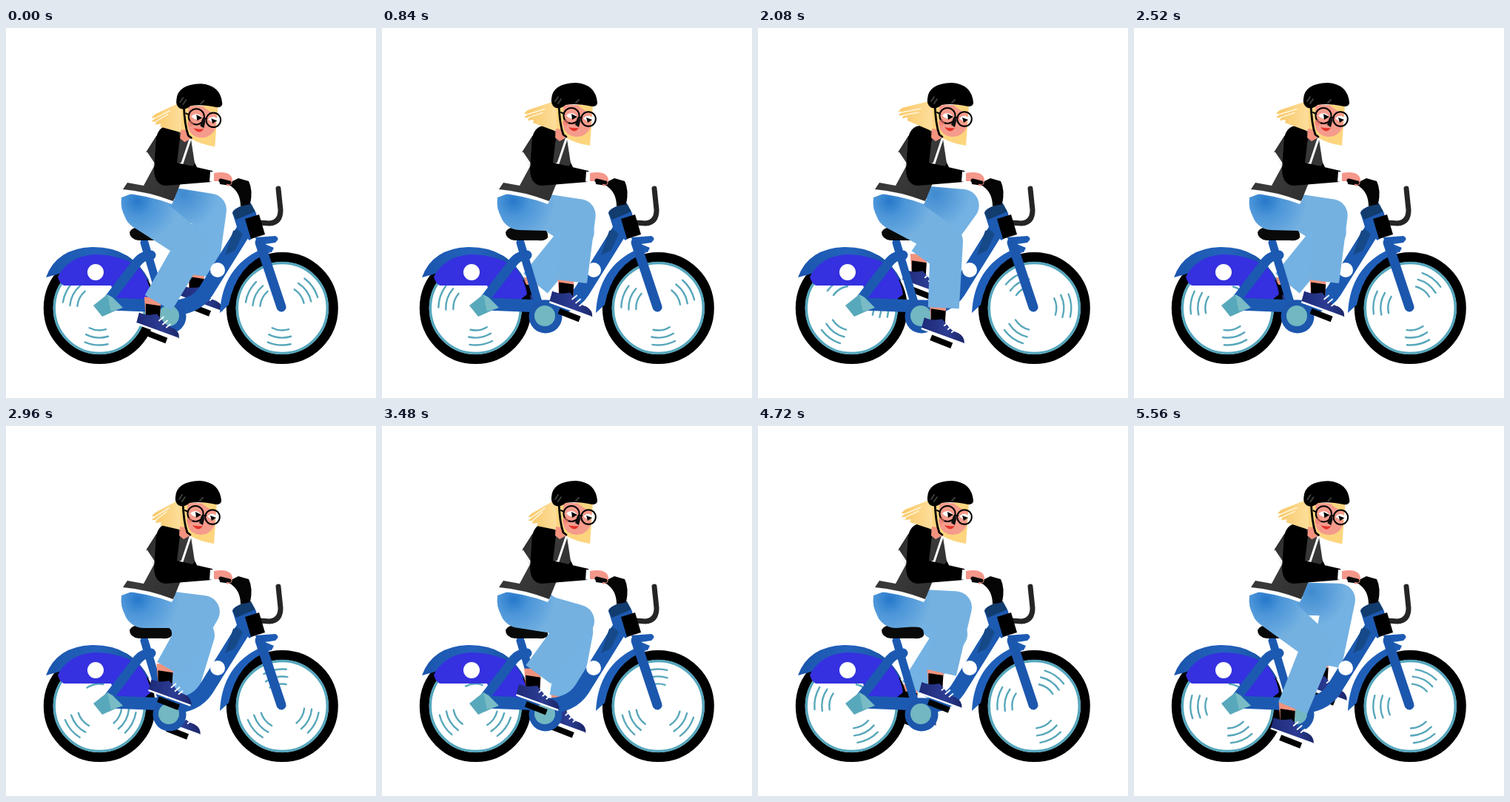
An HTML page that plays this animation: 500 px wide and 500 px high, repeating every 5600 ms.

```html
<!DOCTYPE html>
<html lang="en">
<head>
<meta charset="utf-8">
<title>Cyclist</title>
<style>
  html, body { margin: 0; width: 100%; height: 100%; overflow: hidden; background: #fff; }
  svg { display: block; width: 100vw; height: 100vh; }
  .line { fill: none; stroke-linecap: round; stroke-linejoin: round; }
</style>
</head>
<body>
<svg viewBox="0 0 500 500">
  <defs>
    <radialGradient id="nearDenim" gradientUnits="userSpaceOnUse" cx="178" cy="234" r="56">
      <stop offset="0" stop-color="#2678ca"/><stop offset=".35" stop-color="#4a94d8"/><stop offset="1" stop-color="#74b1e1"/>
    </radialGradient>
    <radialGradient id="farDenim" gradientUnits="userSpaceOnUse" cx="240" cy="224" r="48">
      <stop offset="0" stop-color="#3f8ad0"/><stop offset="1" stop-color="#74b2e3"/>
    </radialGradient>
    <linearGradient id="shoeFill">
      <stop offset="0" stop-color="#1d2a78"/><stop offset=".6" stop-color="#2c3c92"/><stop offset="1" stop-color="#1b2668"/>
    </linearGradient>
    <linearGradient id="jacketFill" x2="1" y2="1">
      <stop offset="0" stop-color="#1e1e1e"/><stop offset=".5" stop-color="#3a3a3a"/><stop offset="1" stop-color="#2a2a2a"/>
    </linearGradient>
    <linearGradient id="hairFill">
      <stop offset="0" stop-color="#f9c765"/><stop offset="1" stop-color="#fde0a0"/>
    </linearGradient>
    <linearGradient id="fenderFill">
      <stop offset="0" stop-color="#1a55ad"/><stop offset=".5" stop-color="#2363bd"/><stop offset="1" stop-color="#174c9d"/>
    </linearGradient>
    <g id="shoe">
      <path d="M-19-8H4L2 20H-17Z" fill="#f0937e"/>
      <path d="M-17 1L3 4L2 21H-17Z"/>
      <path d="M-26 13Q-16 18-2 15L5 23Q10 31 20 34Q29 39 28 48L-30 28Z" fill="url(#shoeFill)"/>
      <path class="line" d="M-29 28L26 48" stroke="#fff" stroke-width="2.4"/>
      <path class="line" d="M1 24l6-5M6 29l6-5M11 33l5-4" stroke="#fff" stroke-width="1.8"/>
    </g>
    <path id="pedal" d="M-17 40L11 51" stroke="#000" stroke-width="8"/>
    <g id="wheel">
      <circle r="69" fill="#fff" stroke="#000" stroke-width="13"/>
      <circle r="61" fill="none" stroke="#55a6bc" stroke-width="3.5"/>
      <g class="line spin" stroke="#58a7bb" stroke-width="2.4"></g>
    </g>
  </defs>

  <g id="farLeg">
    <use href="#pedal"/>
    <use href="#shoe"/>
    <path fill="url(#farDenim)"/>
  </g>

  <use href="#wheel" x="126.3" y="378.5"/>
  <use href="#wheel" x="373.3" y="378.5"/>

  <!-- rear fender and skirt -->
  <path d="M54 337Q68 298 116 296Q170 295 194 342L186 338Q150 318 84 328Q70 333 54 337Z" fill="url(#fenderFill)"/>
  <path d="M70 336Q86 307 122 306Q164 308 183 327Q194 344 196 360L187 367H149L142 348H78Q72 345 70 336Z" fill="#3530e0"/>
  <circle cx="121" cy="330" r="11" fill="#fff"/>

  <!-- frame -->
  <g class="line" stroke="#1c5ab2">
    <path d="M138 368L176 318Q184 307 196 307" stroke-width="13"/>
    <path d="M187 290L212 374" stroke-width="11"/>
    <path d="M140 373L216 376" stroke-width="17" style="stroke-linecap:butt"/>
    <path d="M216 378Q254 380 270 356L326 266" stroke-width="21"/>
  </g>
  <path d="M307 274L325 268L309 301L296 307Z" fill="#164987"/>
  <circle cx="286" cy="327" r="10" fill="#fff"/>
  <path d="M118 375L137 360L157 378L130 390Z" fill="#58a8bb"/>
  <path d="M137 360L144 364L158 378L142 383Z" fill="#79bcc5"/>
  <circle cx="221" cy="390" r="22.5" fill="#1c57ad"/>
  <circle cx="220" cy="389" r="14" fill="#72b7c1"/>

  <!-- front end -->
  <path d="M289 385Q292 323 345 299L358 303Q312 318 301 374Z" fill="#1f5fb9"/>
  <path d="M337 283L364 281Q371 284 364 290L350 292L362 297L359 303L342 301Z" fill="#1d5bb4"/>
  <path class="line" d="M343 290L372 377" stroke="#1c57ae" stroke-width="13"/>
  <path class="line" d="M368 217L371 246Q371 263 356 264L342 263" stroke="#252525" stroke-width="7"/>
  <path d="M306 250Q308 242 330 238L338 250L342 278L329 287L313 272Z" fill="#1d5ab1"/>
  <path d="M306 250Q308 242 331 237L337 248L311 259Z" fill="#123c6e"/>
  <path d="M323 258L342 252L350 279L331 285Z"/>
  <path d="M288 204L304 208L314 203L328 207Q334 219 330 238L317 241Q317 222 303 213L289 211Z" fill="#050505"/>

  <!-- saddle -->
  <path d="M167 276Q170 268 185 269L218 272Q225 274 224 283Q222 288 210 287L179 287Q167 285 167 276Z" fill="#090909"/>

  <g id="nearLeg">
    <use href="#pedal"/>
    <use href="#shoe"/>
    <path fill="url(#nearDenim)"/>
  </g>
  <path d="M156 229L175 222L224 233L210 260L162 256Q154 246 156 229Z" fill="url(#nearDenim)"/>

  <!-- torso and arm -->
  <path d="M157 218L188 216L228 231L224 238Q192 226 156 223Z" fill="#fff"/>
  <path d="M243 158L258 188L246 192Z"/>
  <path d="M230 135L250 150L255 183L235 212L226 234Q192 221 158 218L164 209L186 213L200 187L189 168L203 146Z" fill="url(#jacketFill)"/>
  <path class="line" d="M190 169L202 187M249 150L238 183L220 190" stroke="#fff" stroke-width="3"/>
  <path d="M203 148Q207 131 222 132Q238 136 234 157L231 182L279 193L278 208L216 213Q200 212 200 190Z"/>
  <path d="M276 194l5 1l-1 13l-5-.5Z" fill="#fff"/>
  <path d="M281 196Q295 193 302 198Q308 202 305 211L299 214L297 207L281 207Z" fill="#f5978a"/>
  <path class="line" d="M290 206L302 209" stroke="#080808" stroke-width="5"/>

  <!-- head -->
  <g id="head">
    <path id="tuft" fill="url(#hairFill)"/>
    <path id="strands" class="line" stroke="#fff3d6" stroke-width="1.6"/>
    <path d="M235 103L285 105L281 159Q262 156 250 149L236 140Z" fill="#fcd57e"/>
    <path d="M235 136L243 137L249 148L240 153L234 148Z" fill="#f3937f"/>
    <path d="M245 105Q265 101 284 111L282 134Q276 147 262 147Q249 146 245 134Z" fill="#f59b8c"/>
    <path d="M263 103L284 105L284 115Q275 114 263 103Z" fill="#fcd57e"/>
    <path class="line" d="M239 103Q240 130 245 144L249 147" stroke="#000" stroke-width="2.8"/>
    <path d="M229 96Q230 75 262 74Q289 76 291 101Q291 106 284 106Q262 101 248 104Q240 111 233 107Q228 103 229 96Z"/>
    <path class="line" d="M234 99l4-6M238 102l4-6M262 101l4-4" stroke="#3c3c3c" stroke-width="2"/>
    <path d="M249 118Q257 111 264 120Q256 126 249 118ZM272 122Q279 115 286 123Q280 130 272 122Z" fill="#fff"/>
    <path d="M256 116l8 4l-7 4ZM276 121l8 3l-6 4Z"/>
    <g class="line" stroke="#000" stroke-width="2">
      <circle cx="256" cy="118.5" r="10.6"/>
      <circle cx="279" cy="123" r="9.8"/>
      <path d="M246 116l-4-2M266 121l4 0"/>
    </g>
    <path d="M264 121Q268 119 268 126L266 134L261 131Z" fill="#111"/>
    <path d="M252 134Q259 136 266 135Q260 144 252 134Z" fill="#e3332b"/>
    <circle cx="248" cy="128" r="4" fill="#f17c6e" opacity=".6"/>
  </g>
</svg>
<script>
  const FRAME_MS = 40, FRAMES = 140, PEDAL_TURNS = 10, WHEEL_TURNS = 11;
  const TAU = Math.PI * 2, DEG = TAU / 360;
  const $ = selector => document.querySelector(selector);
  const svgNS = "http://www.w3.org/2000/svg";
  const polar = (x, y, r, a) => [x + r * Math.cos(a), y + r * Math.sin(a)];
  const pts = list => list.map(p => p.map(v => v.toFixed(2)).join(" ")).join("L");

  const near = { el: $("#nearLeg"), hip: [186, 246], hipR: 27, center: [231, 357], turn: 150 * DEG };
  const far = { el: $("#farLeg"), hip: [196, 233], hipR: 22, center: [236, 340], turn: 350 * DEG };
  const THIGH = 81, SHIN = 90, KNEE_R = 22, HEM_R = 21, CRANK = 29;

  // Three groups of concentric arcs blur each wheel.
  const spin = $(".spin");
  for (const mid of [95, 207, 325]) {
    for (const [r, half] of [[30, 22], [40, 22], [50, 18]]) {
      const arc = document.createElementNS(svgNS, "path");
      const [a, b] = [mid - half, mid + half].map(deg => polar(0, 0, r, deg * DEG));
      arc.setAttribute("d", `M${pts([a])}A${r} ${r} 0 0 1 ${pts([b])}`);
      spin.append(arc);
    }
  }

  const disc = (x, y, r) => `M${x - r} ${y}a${r} ${r} 0 1 1 ${2 * r} 0a${r} ${r} 0 1 1 ${-2 * r} 0Z`;

  // Tapered band; its points keep the winding of the discs.
  function band(a, b, ra, rb) {
    const n = Math.atan2(b[1] - a[1], b[0] - a[0]) + Math.PI / 2;
    return "M" + pts([polar(...a, -ra, n), polar(...b, -rb, n), polar(...b, rb, n), polar(...a, ra, n)]) + "Z";
  }

  function drawLeg(leg, phase) {
    const hem = polar(...leg.center, CRANK, phase + leg.turn);
    const [dx, dy] = [hem[0] - leg.hip[0], hem[1] - leg.hip[1]];
    const d = Math.hypot(dx, dy);
    const bend = Math.acos((THIGH ** 2 + d ** 2 - SHIN ** 2) / (2 * THIGH * d));
    const knee = polar(...leg.hip, THIGH, Math.atan2(dy, dx) - bend);
    leg.el.lastElementChild.setAttribute("d",
      disc(...leg.hip, leg.hipR) + band(leg.hip, knee, leg.hipR, KNEE_R) +
      disc(...knee, KNEE_R) + band(knee, hem, KNEE_R, HEM_R));
    leg.el.querySelectorAll("use").forEach(part =>
      part.setAttribute("transform", `translate(${hem[0]} ${hem[1]})`));
  }

  function drawHead(phase) {
    const wave = Math.cos(phase - 65 * DEG);
    const x = 193.5 + 4 * wave, y = 121 + 5 * wave;
    const nod = 1.3 * Math.max(0, Math.cos(phase)) ** 12;
    $("#head").setAttribute("transform", `translate(${nod} ${nod})`);
    $("#tuft").setAttribute("d", "M" + pts([
      [239, 97], [x + 5, y - 8], [x, y - 3], [x + 6, y - 3], [x, y + 2], [x + 7, y + 2],
      [x + 5, y + 6], [x + 13, y + 5], [x + 12, y + 9], [239, 141]]) + "Z");
    $("#strands").setAttribute("d",
      `M${x + 4} ${y - 2}L220 ${110 + wave}M${x + 6} ${y + 2}L217 ${115 + wave}`);
  }

  function draw(frame) {
    const progress = frame / FRAMES;
    const phase = progress * PEDAL_TURNS * TAU;
    drawLeg(far, phase);
    drawLeg(near, phase);
    drawHead(phase);
    spin.setAttribute("transform", `rotate(${progress * WHEEL_TURNS * 360})`);
  }

  const start = performance.now();
  function tick() {
    draw(Math.floor((performance.now() - start) / FRAME_MS) % FRAMES);
    requestAnimationFrame(tick);
  }
  draw(0);
  requestAnimationFrame(tick);
</script>
</body>
</html>
```
